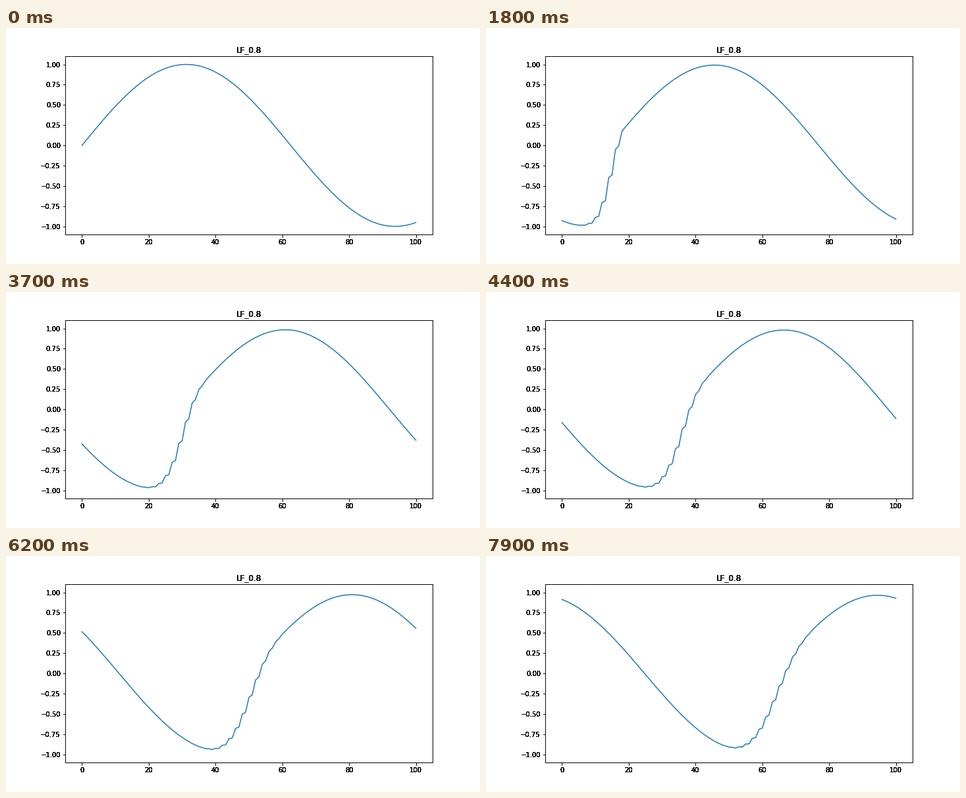
A matplotlib script for the animation above (8000 ms loop, 720 px wide and 360 px high).

```python
import matplotlib.pyplot as plt
import numpy as np
from matplotlib.animation import FuncAnimation

CFL = 0.8
STEPS = 80
LAYERS = 6  # stacked axes give the solid, hard-edged labels

plt.rcParams.update({
    "font.family": "DejaVu Sans",
    "font.size": 10,
    "figure.facecolor": "white",
    "figure.subplot.bottom": 0.125,
})


def lax_friedrichs(u):
    """One periodic step of the advection equation."""
    left, right = np.roll(u, 1), np.roll(u, -1)
    return 0.5 * (left + right) - 0.5 * CFL * (right - left)


def add_frame(fig, index):
    ax = fig.add_subplot(label=f"layer {index}")
    ax.set_title(f"LF_{CFL}")
    ax.set_xlim(-5, 105)
    ax.set_ylim(-1.1, 1.1)
    ax.set_xticks(np.arange(0, 101, 20))
    ax.set_yticks(np.linspace(-1, 1, 9))
    if index:
        ax.patch.set_visible(False)
    return ax


x = np.arange(101)
history = [np.sin(2 * np.pi * CFL * x / 100)]
for _ in range(STEPS - 1):
    history.append(lax_friedrichs(history[-1]))

fig = plt.figure(figsize=(10, 5), dpi=72)
layers = [add_frame(fig, i) for i in range(LAYERS)]
line, = layers[0].plot(x, history[0], color="#1f77b4", lw=1.5)


def update(n):
    line.set_ydata(history[n])
    return line,


anim = FuncAnimation(fig, update, frames=STEPS, interval=100,
                     repeat=True, repeat_delay=0)
plt.show()
```
